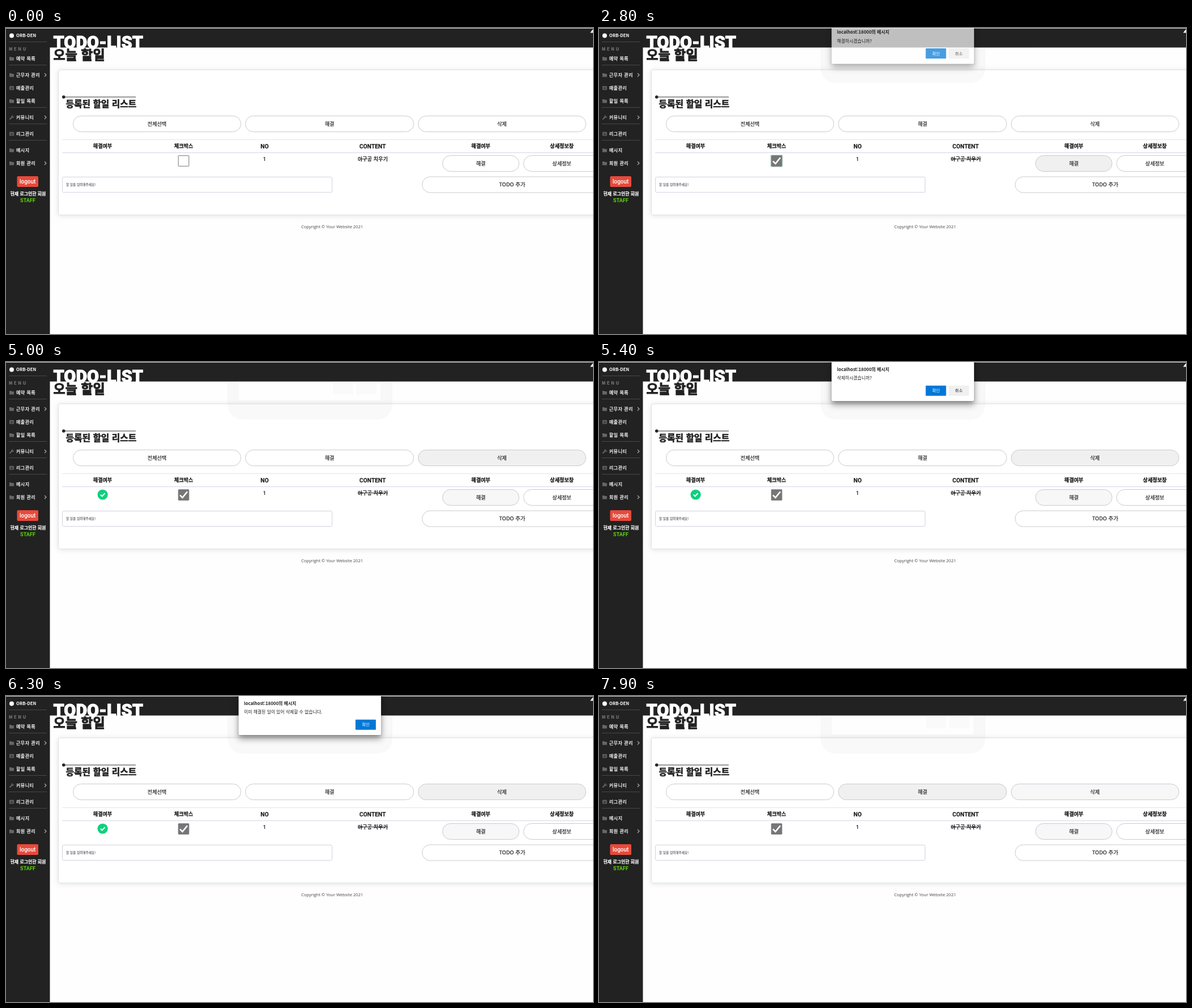
Write an HTML page that moves like this. It is 1036 by 541 pixels and loops after 8 s.

```html
<!DOCTYPE html>
<html lang="ko">
<head>
<meta charset="utf-8">
<title>Todo list</title>
<style>
html, body { margin: 0; width: 100%; height: 100%; overflow: hidden; background: #fefefe; }
svg { display: block; width: 100%; height: 100%; }
text { font-family: "Noto Sans CJK KR", "Noto Sans CJK", sans-serif; white-space: pre; }
.latin { font-family: Roboto, "Noto Sans CJK KR", sans-serif; }
.card { filter: drop-shadow(0 1px 5px rgba(58, 59, 69, .14)); }
.dialog { filter: drop-shadow(0 1px 1.5px rgba(0, 0, 0, .2)) drop-shadow(0 6px 6px rgba(0, 0, 0, .42)); }
</style>
</head>
<body>
<svg id="stage" viewBox="0 0 1036 541" preserveAspectRatio="xMinYMin meet"></svg>
<script>
const LOOP = 8000;
const stage = document.getElementById('stage');

function add(tag, attrs, parent = stage) {
  const el = document.createElementNS('http://www.w3.org/2000/svg', tag);
  for (const key in attrs) el.setAttribute(key, attrs[key]);
  parent.appendChild(el);
  return el;
}
function rect(x, y, width, height, fill, extra, parent) {
  return add('rect', { x, y, width, height, fill, ...extra }, parent);
}
function line(x1, x2, y, stroke) {
  return add('path', { d: `M${x1} ${y}H${x2}`, stroke, fill: 'none' });
}
// ink thickens the strokes of the letters
function label(str, x, y, size, { ink = 0, fill = '#222', ...extra } = {}, parent) {
  const el = add('text', { x, y, fill, 'font-size': size, stroke: fill, 'stroke-width': ink, ...extra }, parent);
  el.textContent = str;
  return el;
}
const MID = { 'text-anchor': 'middle' };
const BOLD = { 'font-weight': 700 };
function pill(x, right, y, str, cx, size = 9.1) {
  const box = rect(x, y, right - x, 28, '#fff', { rx: 14, stroke: '#c8cacf' });
  label(str, cx, y + 17, size, { ...MID, ink: .2 });
  return box;
}
function tick(d, width, parent) {
  return add('path', { d, fill: 'none', stroke: '#fff', 'stroke-width': width }, parent);
}
function show(el, on) {
  el.setAttribute('opacity', +on);
}

// Header and title
rect(0, 0, 1036, 541, '#fefefe');
rect(0, 0, 1036, 34.5, '#222');
label('TODO-LIST', 83.5, 36, 30.5, { class: 'latin', fill: '#fff', 'font-weight': 900, ink: 1 });
label('오늘 할일', 83.5, 56, 23, { 'font-weight': 900, ink: .9 });
add('path', { d: 'M1031 8.5L1036 2V8.5Z', fill: '#fff' });

// Sidebar
rect(0, 0, 77.5, 541, '#222');
rect(0, 0, 1036, 1, '#d4d4d4');
add('circle', { cx: 10, cy: 13.5, r: 4, fill: '#fff' });
label('ORB-DEN', 18, 16.4, 7.7, { ...BOLD, fill: '#fff' });
label('MENU', 5, 39.7, 7.6, { ...BOLD, fill: '#777', ink: .2, 'letter-spacing': 2.6 });
for (const y of [24.5, 65.5, 140.5, 169.5, 198.5]) line(5, 72, y, '#484848');

const icons = {
  folder: y => add('path', { d: `M6 ${y - 3}h3.2l1 1.1H14v5.4H6Z`, fill: '#666' }),
  table: y => {
    rect(6, y - 3.3, 8, 6.8, '#666', { rx: 1 });
    add('path', { d: `M7 ${y - .8}h6M7 ${y + 1.5}h6M10 ${y - 1}v3.5`, stroke: '#222', 'stroke-width': .8 });
  },
  wrench: y => {
    add('path', { d: `M7 ${y + 3}L11 ${y - 1}`, stroke: '#666', 'stroke-width': 2, 'stroke-linecap': 'round' });
    add('path', { d: `M11.8 ${y - 3.3}a1.7 1.7 0 1 0 1.8 1.8`, stroke: '#666', 'stroke-width': 1.5, fill: 'none' });
  }
};
const menu = [
  ['예약 목록', 54, 'folder'], ['근무자 관리', 83, 'folder', true],
  ['매출관리', 106, 'table'], ['할일 목록', 129, 'folder'],
  ['커뮤니티', 158, 'wrench', true], ['리그관리', 187, 'table'],
  ['메시지', 216, 'folder'], ['회원 관리', 239, 'folder', true]
];
for (const [name, y, icon, more] of menu) {
  icons[icon](y);
  label(name, 18, y + 2.9, 8, { fill: '#fff', 'letter-spacing': .5, ink: .25 });
  if (more) add('path', { d: `M68 ${y - 3}l3 3l-3 3`, fill: 'none', stroke: '#aaa', 'stroke-width': 1.2 });
}
rect(19.5, 262, 37.5, 19, '#e74a3b', { rx: 2 });
label('logout', 38.2, 275, 10, { ...MID, class: 'latin', fill: '#fff', 'font-weight': 500 });
label('현재 로그인한 회원', 39, 296.2, 7.95, { ...MID, ...BOLD, fill: '#fff', ink: .2 });
label('STAFF', 38.6, 308.4, 9.2, { ...MID, ...BOLD, class: 'latin', fill: '#5fd30f' });

// Card
rect(92.5, 74, 960, 256.5, '#fff', { rx: 3, stroke: '#dfe0e4', class: 'card' });

// Shade the dialog casts on the page
const shade = add('g', {});
const shadeEdge = add('path', { 'fill-rule': 'evenodd', 'fill-opacity': .025 }, shade);
for (const x of [577, 618]) rect(x, 36, 36, 21, '#000', { 'fill-opacity': .015 }, shade);

add('circle', { cx: 101.8, cy: 122, r: 2.8, fill: '#222' });
line(102, 229, 122, '#333');
label('등록된 할일 리스트', 105.5, 140.3, 15.75, { 'font-weight': 900, ink: .6 });

pill(118.5, 414.5, 155.5, '전체선택', 266.5);
const solveAll = pill(422.5, 719.5, 155.5, '해결', 571);
const remove = pill(727.5, 1023.5, 155.5, '삭제', 875.3);

// Table
line(99, 1036, 197.5, '#e3e5ea');
line(99, 1036, 220.5, '#d5d7e2');
for (const [name, x] of [['해결여부', 170.5], ['체크박스', 313.5], ['해결여부', 838], ['상세정보창', 981]])
  label(name, x, 212.2, 9.1, { ...MID, ...BOLD, ink: .3 });
for (const [name, x] of [['NO', 456.5], ['CONTENT', 647]])
  label(name, x, 212.5, 10.3, { ...MID, ...BOLD, class: 'latin', ink: .2 });
label('1', 456.3, 235.2, 9.5, { ...MID, class: 'latin', 'font-weight': 500 });
label('야구공 치우기', 647.3, 235, 9.2, { ...MID, ...BOLD });
const strike = line(621, 674, 231.5, '#222');
const solve = pill(770.5, 905.5, 225.5, '해결', 838);
pill(913.5, 1049, 225.5, '상세정보', 981);

const ring = rect(303.2, 224.7, 20.6, 20.6, 'none', { rx: .8, stroke: '#8cc3b6', 'stroke-width': 1.2 });
const box = rect(304.2, 225.7, 18.6, 18.6, '#fff', { rx: .6 });
const boxTick = tick('M307 235.3L311.4 239.8L320 229.3', 2.6);

const done = add('g', {});
add('circle', { cx: 170.6, cy: 234.5, r: 9.1, fill: '#0fd07c' }, done);
tick('M166.8 234.6L169.6 237.3L174.6 232', 2, done);

rect(99.5, 263.5, 476, 27, '#fff', { rx: 2, stroke: '#d1d3de' });
label('할 일를 입력해주세요!', 106, 279.1, 5.7, { ...BOLD, fill: '#6e707e' });
pill(734.5, 1051, 263, 'TODO 추가', 893.3, 9.5);
label('Copyright © Your Website 2021', 575.5, 354, 7.5,
  { ...MID, fill: '#444', style: 'font-family:"Open Sans",sans-serif' });

// Dialog
const dialog = add('g', {});
rect(410.5, -20, 251.4, 89, '#fff', { rx: 2, class: 'dialog' }, dialog);
label('localhost:18000의 메시지', 420, 15.8, 7.85, BOLD, dialog);
const message = label('', 420, 31.2, 7.85, {}, dialog);
const cancel = add('g', {}, dialog);
rect(617, 41.7, 36, 18, '#f0f0f0', { rx: 1 }, cancel);
label('취소', 635, 53.2, 7.4, MID, cancel);
const confirm = add('g', {}, dialog);
const confirmBox = rect(576.6, 41.7, 36, 18, '#0078d7', { rx: 1 }, confirm);
label('확인', 594.8, 53.2, 7.4, { ...MID, fill: '#fff' }, confirm);

// Time, opacity, vertical offset, button held down
const poses = [
  [0, 0, -12], [2700, .3, -9], [2800, .71, -5.6], [2900, 1, 0],
  [3500, 1, 0, true], [3600, 1, 0], [3700, .92, -3.8], [3800, 0, -12],
  [5300, .71, -5.6], [5400, 1, 0],
  [5700, 1, 0, true], [5800, 1, 0], [5900, .92, -3.8], [6000, .3, -9], [6100, 0, -12],
  [6200, .71, -5.6], [6300, 1, 0],
  [6900, 1, 0, true], [7000, 1, 0], [7100, .92, -3.8], [7200, .3, -9], [7300, 0, -12]
];

function at(steps, t) {
  return steps.filter(step => step[0] <= t).pop();
}

function drawDialog(t) {
  const [, opacity, dy, held] = at(poses, t);
  const notice = t >= 6100;
  dialog.setAttribute('opacity', opacity);
  dialog.setAttribute('transform', `translate(0 ${dy})`);
  message.textContent = notice ? '이미 해결된 일이 있어 삭제할 수 없습니다.'
    : t < 5000 ? '해결하시겠습니까?' : '삭제하시겠습니까?';
  show(cancel, !notice);
  confirm.setAttribute('transform', `translate(${notice ? 40.2 : 0} 0)`);
  confirmBox.setAttribute('fill', held ? '#006cc1' : '#0078d7');

  const low = t < 2900 ? 97 : 102;
  show(shade, t >= 2700);
  shadeEdge.setAttribute('d', `M391 35H682V${low - 30}Q682 ${low} 652 ${low}H421Q391 ${low} 391 ${low - 30}Z` +
    'M411 35H661V68H411Z');
}

function drawPage(t) {
  const checked = t >= 1200;
  const hover = t >= 600 && t < 2100;
  const edge = hover && t < 1100 ? '#4f4f4f' : '#767676';
  const fill = hover ? '#5e5e5e' : '#767676';
  box.setAttribute('fill', checked ? fill : '#fff');
  box.setAttribute('stroke', checked ? fill : edge);
  show(boxTick, checked);
  show(strike, checked);
  ring.setAttribute('opacity', at([[0, 0], [1200, .5], [1300, 1], [2700, .6], [2900, 0]], t)[1]);
  show(done, t >= 3600 && t < 7900);

  solve.setAttribute('fill', at([[0, '#fff'], [2400, '#f0f0f0'], [3700, '#f2f2f2'], [3800, '#f7f7f7']], t)[1]);
  remove.setAttribute('fill', at([[0, '#fff'], [5000, '#f0f0f0'], [7300, '#f7f7f7']], t)[1]);
  solveAll.setAttribute('fill', t >= 7700 ? '#f0f0f0' : '#fff');
}

const start = performance.now();
function frame() {
  const t = (performance.now() - start) % LOOP;
  drawPage(t);
  drawDialog(t);
  requestAnimationFrame(frame);
}
frame();
</script>
</body>
</html>
```
